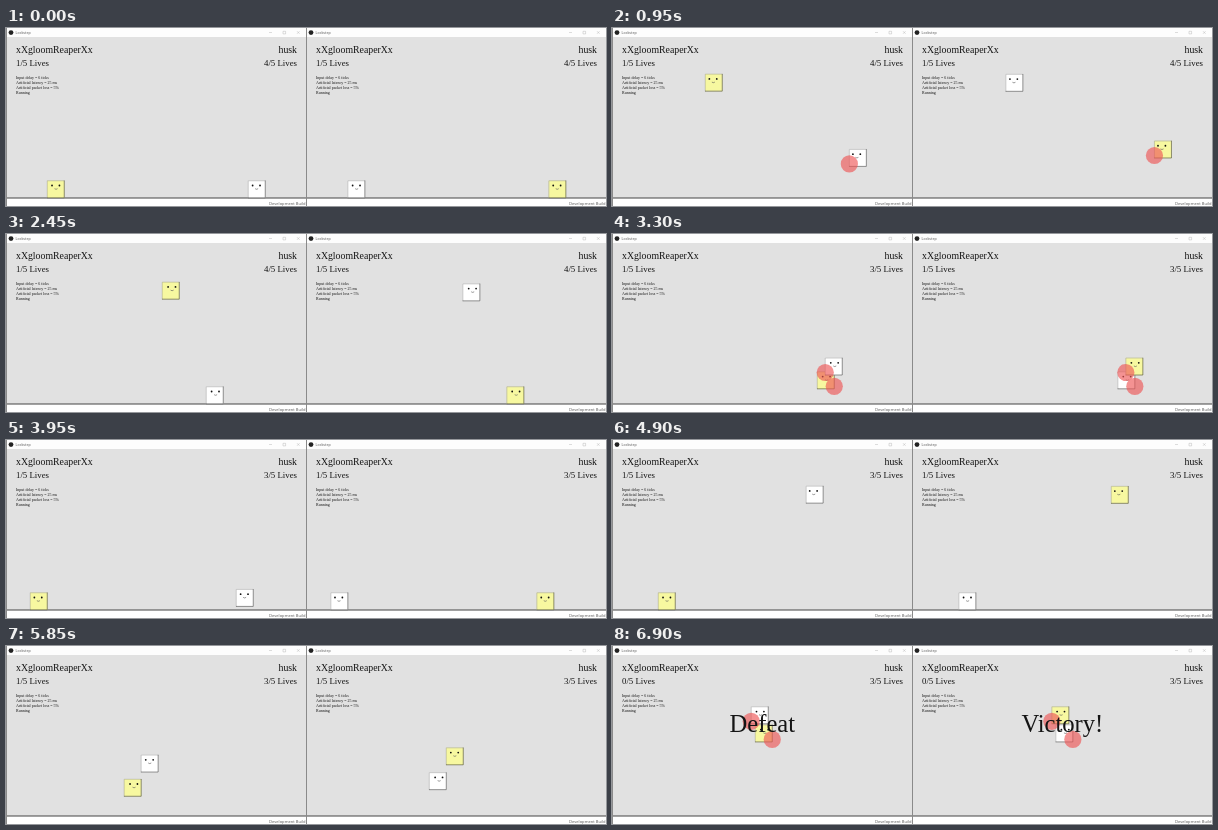
Animation, 600 px wide and 178 px high, one loop 7.1 s. Source, as an HTML page:

```html
<!DOCTYPE html>
<html lang="en">
<head>
<meta charset="utf-8">
<title>Lockstep</title>
<style>
  html, body { margin: 0; width: 100%; height: 100%; overflow: hidden; background: #e1e1e1; }
  svg { display: block; width: 600px; height: 178px; }
  text { font-family: "Liberation Serif", "Noto Serif", serif; fill: #141414; white-space: pre; }
  .ui { font-family: "Open Sans", "Noto Sans", sans-serif; fill: #555; }
  .end { text-anchor: end; }
  .mid { text-anchor: middle; }
</style>
</head>
<body>
<svg id="stage" viewBox="0 0 600 178"></svg>
<script>
const LOOP = 7100, STEP = 50, LAG = 25;
const HIT = 3000, SPAWN = 3520, RESUME = 3550, OVER = 6300;
const FLOOR = 170, SIZE = 17.5, DROP = 65;
const RUN = 180, JUMP = 413, GRAVITY = 800, SWING = 210;

// runs: [time, goal x]; jumps: [time, take-off speed]; swings: start times
const players = [
  {
    home: 41, spawn: 45, side: 1,
    runs: [[380, 93], [1300, 102], [2050, 156], [2700, 205], [SPAWN, 24], [4700, 46],
           [4920, 33], [5150, 130], [5783, 110], [6116, 143]],
    jumps: [[430], [2005], [SPAWN, 0], [5100, 326], [6070]],
    swings: [2850, 5050, 6150],
    look: t => .4 + .9 * Math.cos((t - 2450) / 3400 * 2 * Math.PI)
  },
  {
    home: 242, spawn: 245, side: -1,
    runs: [[0, 283], [695, 200], [1500, 182], [1900, 200], [2850, 213], [3700, 230],
           [4000, 249], [4594, 152], [5755, 130], [6200, 139]],
    jumps: [[0], [2925], [SPAWN, 0], [3930, 175], [4380], [5200, 220], [5975]],
    swings: [870, 2880, 6150],
    look: t => Math.cos((t - 2850) / 3950 * 2 * Math.PI)
  }
];

const stage = document.getElementById('stage');

function add(parent, tag, attrs, text) {
  const el = document.createElementNS('http://www.w3.org/2000/svg', tag);
  for (const k in attrs) el.setAttribute(k, attrs[k]);
  if (text) el.textContent = text;
  parent.appendChild(el);
  return el;
}

function label(g, x, y, size, text, cls = '') {
  return add(g, 'text', { x, y, 'font-size': size, class: cls }, text);
}

function line(g, d, stroke, width = 1) {
  return add(g, 'path', { d, stroke, 'stroke-width': width, fill: 'none' });
}

// Run towards each goal at full speed until the next order.
function across(p, t) {
  const born = t >= SPAWN ? SPAWN : 0;
  const orders = p.runs.filter(r => r[0] >= born && r[0] <= t);
  let x = born ? p.spawn : p.home;
  orders.forEach(([from, goal], i) => {
    const until = i + 1 < orders.length ? orders[i + 1][0] : t;
    const reach = RUN * (until - from) / 1000;
    x += Math.max(-reach, Math.min(reach, goal - x));
  });
  return x;
}

// Height above the floor; a jump in mid-air starts from where the block is.
function lift(p, t) {
  let from = 0, h = 0, v = 0;
  const at = time => {
    const s = (time - from) / 1000;
    return Math.max(0, h + v * s - GRAVITY / 2 * s * s);
  };
  for (const [time, speed = JUMP] of p.jumps) {
    if (time > t) break;
    h = time === SPAWN ? DROP : at(time);
    v = speed;
    from = time;
  }
  return at(t);
}

function makeBlock(g, fill) {
  const body = add(g, 'g', {});
  add(body, 'rect', { width: SIZE, height: SIZE, fill });
  line(body, `M.25 ${SIZE}V.25H${SIZE}`, '#999', .5);
  line(body, `M${SIZE - .25} 0V${SIZE - .25}H0`, '#222', .5);
  const face = add(body, 'g', {});
  for (const x of [4.8, 12.2]) add(face, 'circle', { cx: x, cy: 5, r: .9, fill: '#111' });
  line(face, 'M7.3 8.2q1.5 1.2 3 0', '#555', .6);
  return { body, face };
}

function makeWindow(left, mine, result) {
  const g = add(stage, 'g', { transform: `translate(${left} 0)` });
  add(g, 'rect', { width: 300, height: 178, fill: '#e1e1e1' });
  add(g, 'rect', { width: 300, height: 9, fill: '#fdfdfd' });
  add(g, 'rect', { y: 170, width: 300, height: 8, fill: '#fff' });
  line(g, 'M0 170H300', '#444');
  line(g, 'M.5 0V178', '#8a8a8a');
  add(g, 'circle', { cx: 5, cy: 4.6, r: 2.4, fill: '#222' });
  label(g, 9.5, 6.1, 3.7, 'Lockstep', 'ui');
  line(g, 'M263 4.5h3M277 3.3h2.6v2.6h-2.6zM291 3.2l2.6 2.6m0-2.6l-2.6 2.6', '#aaa', .4);

  label(g, 10, 24.5, 9.8, 'xXgloomReaperXx');
  label(g, 291, 24.5, 9.8, 'husk', 'end');
  const lives = [label(g, 10, 37.8, 8.8), label(g, 291, 37.8, 8.8, '', 'end')];
  ['Input delay = 6 ticks', 'Artificial latency = 25 ms', 'Artificial packet loss = 5%', 'Running']
    .forEach((s, i) => label(g, 10, 51.3 + i * 4.9, 4, s));

  const world = add(g, 'g', { transform: `translate(${left ? .6 : 0} 0)` });
  const blocks = players.map((p, i) => makeBlock(world, i === mine ? '#f7f8a0' : '#fff'));
  const hits = players.map(() => add(world, 'circle', { r: 8.6, fill: '#ee5555', 'fill-opacity': .64 }));
  label(g, 299.5, 176.6, 4.1, 'Development Build', 'ui end');
  const banner = label(g, 150.3, 86, 24.6, result, 'mid');
  return { lives, blocks, hits, banner, lag: left ? LAG : 0 };
}

const views = [makeWindow(0, 0, 'Defeat'), makeWindow(300, 1, 'Victory!')];

function show(el, on) {
  el.setAttribute('visibility', on ? 'visible' : 'hidden');
}

function draw(t) {
  const over = t >= OVER, paused = t >= HIT && t < RESUME;
  const now = over ? OVER : paused ? HIT : t;
  for (const v of views) {
    const w = over || paused ? now : Math.max(0, now - v.lag);
    players.forEach((p, i) => {
      const { body, face } = v.blocks[i], hit = v.hits[i];
      const x = across(p, w), y = FLOOR - SIZE - lift(p, w);
      body.setAttribute('transform', `translate(${x} ${y})`);
      face.setAttribute('transform', `translate(${p.look(w)} 0)`);
      hit.setAttribute('cx', x + SIZE / 2 + p.side * 8.5);
      hit.setAttribute('cy', y + SIZE / 2 + 6);
      show(hit, p.swings.some(s => now >= s && now < s + SWING));
    });
    v.lives[0].textContent = (over ? 0 : 1) + '/5 Lives';
    v.lives[1].textContent = (t >= HIT ? 3 : 4) + '/5 Lives';
    show(v.banner, over);
  }
}

const start = performance.now();
function frame() {
  const t = Math.max(0, performance.now() - start) % LOOP;
  draw(Math.floor(t / STEP) * STEP);
  requestAnimationFrame(frame);
}
frame();
</script>
</body>
</html>
```
